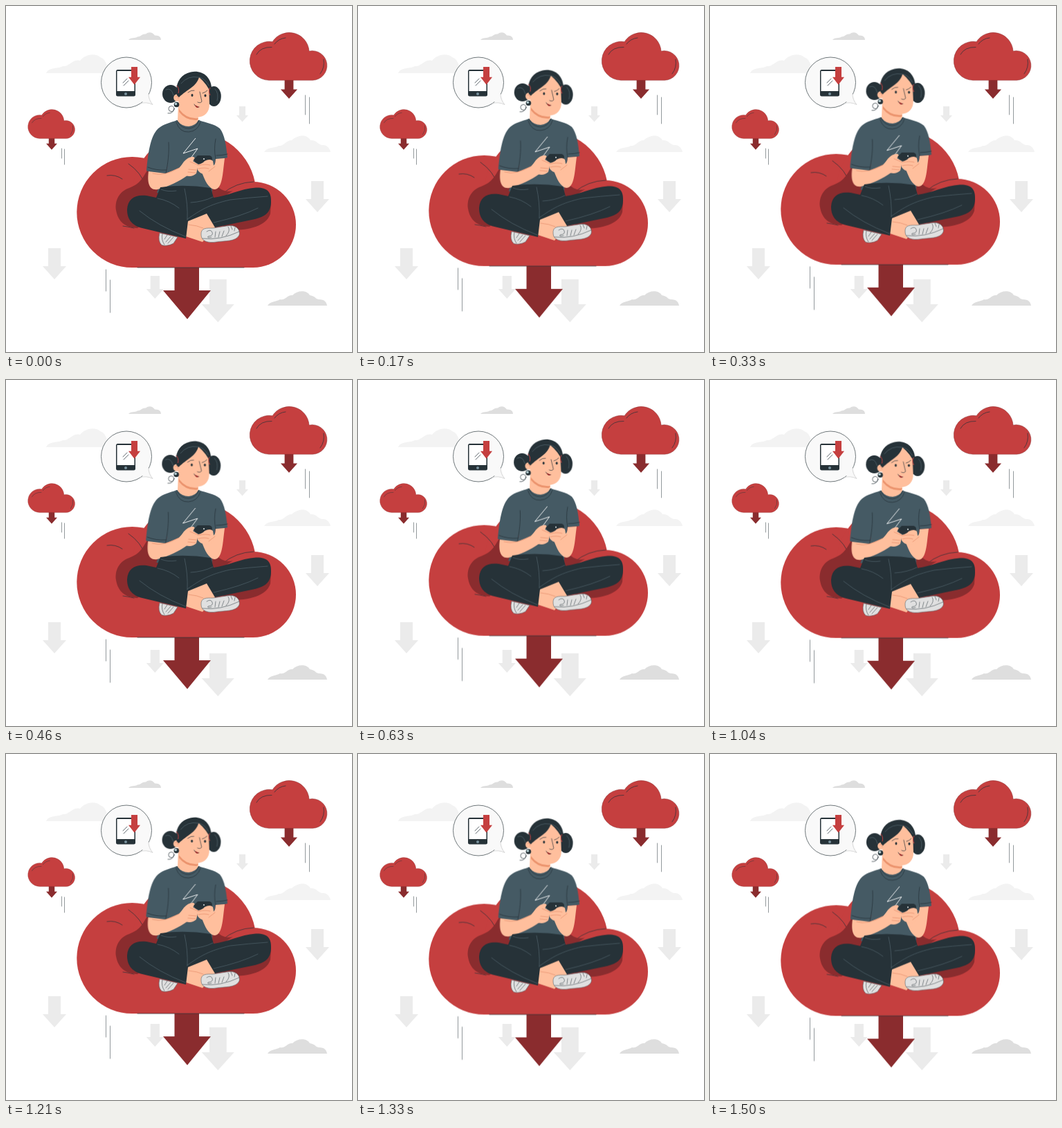
Write an HTML page without scripts that moves like this. It is 500x500 px and loops after 1540 ms.

```html
<!DOCTYPE html>
<html lang="en">
<head>
<meta charset="utf-8">
<title>Cloud download</title>
<style>
html, body { margin: 0; width: 100%; height: 100%; overflow: hidden; background: #fff; }
svg { display: block; width: 100vw; height: 100vh; }
.red { fill: #c53f3f; }
.wine { fill: #8a2c2e; }
.pale { fill: #ebebeb; }
.mist { fill: #f3f3f3; }
.grey { fill: #dedede; }
.ink { fill: #263238; }
.shirt { fill: #455a64; }
.skin { fill: #ffbf9d; }
.line { fill: none; stroke: #263238; stroke-width: .7; stroke-linecap: round; stroke-linejoin: round; }
.thin { stroke-width: .5; }
.rim { stroke: #8a2c2e; stroke-width: .5; }
.seam { fill: none; stroke: #52656e; stroke-width: .7; stroke-linecap: round; }
.blush { fill: none; stroke: #e58e6c; stroke-width: .7; stroke-linecap: round; }
.float, .nod, .breathe { animation: 1540ms linear infinite; }
.float { animation-name: float; }
.nod { animation-name: nod; transform-origin: 268px 165px; }
.breathe { animation-name: breathe; transform-origin: 310px 240px; }
@keyframes float {
  0% { transform: translateY(0); }
  11% { transform: translateY(-2.2px); }
  30% { transform: translateY(-6px); }
  41% { transform: translateY(-8.4px); }
  48% { transform: translateY(-9.2px); }
  57% { transform: translateY(-7.6px); }
  78.6% { transform: translateY(-2.9px); }
  97.4% { transform: translateY(.4px); }
  100% { transform: translateY(0); }
}
@keyframes nod {
  0%, 100% { transform: none; }
  48% { transform: translateY(-.5px) rotate(-1.5deg); }
}
@keyframes breathe {
  0%, 100% { transform: none; }
  48% { transform: scaleX(1.012); }
}
</style>
</head>
<body>
<svg viewBox="0 0 500 500">
  <defs>
    <path id="arrow" d="M-9 0H9V26H17L0 45L-17 26H-9Z"/>
    <g id="puff">
      <path class="rim" d="M380 107.300A28 28 0 1 1 385 51.700A28.800 28.800 0 0 1 438 65.200A21.300 21.300 0 1 1 443 107.300Z"/>
      <path class="line" d="M362 70Q368 59 384 59.500M388 55Q394 47 404 46M459 77Q461 89 454 98"/>
    </g>
  </defs>

  <!-- sky -->
  <path class="grey" d="M177 49C180 45 187 47 190 44.500C196 44 196 40 202 40.500C207 36 213 39 215 42.500C221 42 224 45 224 49Z"/>
  <path class="mist" d="M58 97C62 88 75 91 82 87C92 88 96 76 107 79C115 69 130 68 136 74C147 78 143 88 155 97Z"/>
  <path class="mist" d="M373 211C378 203 388 206 394 202C402 203 404 194 413 194C421 187 434 184 440 194C449 193 450 200 457 201C464 200 468 206 469 211Z"/>
  <path class="grey" d="M378 433C382 426 390 428 396 424C404 426 406 417 414 418C421 411 434 410 439 418C449 420 446 423 452 424C461 424 463 428 464 433Z"/>
  <g class="pale">
    <use href="#arrow" transform="translate(341.500 145) scale(.5)"/>
    <use href="#arrow" transform="translate(450 253)"/>
    <use href="#arrow" transform="translate(70 350)"/>
    <use href="#arrow" transform="translate(215.300 390) scale(.735)"/>
    <use href="#arrow" transform="translate(306.300 395) scale(1.380)"/>
  </g>
  <g class="wine">
    <use href="#arrow" transform="translate(409 102) scale(.71)"/>
    <use href="#arrow" transform="translate(66 186.500) scale(.47)"/>
  </g>
  <use href="#puff" class="red"/>
  <use href="#puff" class="red" transform="translate(-182.500 126.200) scale(.608)"/>
  <path class="line thin" d="M432.500 129V157M438.500 132V170M80.500 206V220M84.500 207V229"/>

  <!-- speech bubble -->
  <circle cx="174" cy="110.500" r="36.500" fill="#f9f9f9" stroke="#4b5559" stroke-width=".8"/>
  <path d="M192 137L212 142.500L205 125Z" fill="#f9f9f9"/>
  <path d="M193 141Q203 138 212 142.500Q206 136 206 127" fill="none" stroke="#c9c9c9" stroke-width=".7"/>
  <rect class="ink" x="159" y="92" width="28" height="38.600" rx="2.500"/>
  <path d="M160.500 94H185.500V123H160.500Z" fill="#fff"/>
  <circle cx="173" cy="127" r="2" fill="#78909c"/>
  <path class="line" d="M169 111L175 105M170 115L177 108"/>
  <use href="#arrow" class="red" transform="translate(185.500 88) scale(.5 .57)"/>

  <g class="float">
    <!-- seat -->
    <path class="line thin" d="M144.500 381V412M150.500 396V443"/>
    <path class="wine" d="M243.500 370H279V411H296L262 452.500L227 411H243.500Z"/>
    <g class="red">
      <circle cx="182.300" cy="298" r="80"/>
      <circle cx="272" cy="272" r="89.500"/>
      <circle cx="357" cy="316" r="62"/>
      <path d="M182 290H357V378H182Z"/>
    </g>
    <path class="line" d="M190 378H344M146 245Q158 243 168 250M177 228Q196 241 202 261M313 271Q332 255 358 254M169 318Q177 319 185 321"/>
    <path class="wine" d="M206 234C198 248 194 257 178 263C163 268 157 282 159 295C162 312 172 320 190 321L230 290V234Z"/>
    <path class="wine" d="M298 246C301 260 313 271 328 267L300 285L285 262ZM325 324C360 324 378 314 382 300L383 285L300 310Z"/>

    <!-- torso -->
    <g class="breathe">
      <path class="shirt" d="M247 165C237 169 228 170 220 177C208 188 205 216 203 238Q216 243 231 242L234 230C232 244 222 254 218 270H298C298 252 302 235 303 221Q313 221 320 219C318 200 316 186 309 177C301 170 289 169 279 165Z"/>
      <path class="line" d="M231 242C234 228 236 211 235 197M246 168Q251 183 264 182Q277 181 281 168M247 166Q253 177 264 177Q275 176 279 165M303 221Q300 207 303 192M205 233Q217 238 232 237M218 263Q222 252 228 246M304 216Q312 216 320 214"/>
      <path d="M274 191L256 213L277 206L264 224" fill="none" stroke="#fff" stroke-width=".9"/>
      <path class="skin" d="M206 239C204 254 206 267 219 265C235 261 251 253 262 245L273 233L263 221L250 234L231 242Z"/>
      <path class="blush" d="M212 242Q228 247 250 234"/>
    </g>

    <!-- legs -->
    <path class="skin" d="M261 306L290 296L303 319L284 341L260 333Z"/>
    <path class="ink" d="M223 262Q258 257 296 263L300 277C319 275 339 264 361 262.500C377 262 384 268 383 284C382 302 371 306 350 310L302 320L290 300L263 311L260 336L197 321C181 317 175 307 175 294C176 278 187 272 203 274L217 277Z"/>
    <path class="seam" d="M258 264Q263 286 262 309M262 308C281 295 293 287 324 280Q350 277 378 275M193 296Q220 318 259 333M224 265Q233 269 246 267M267 284Q285 283 299 276M300 313Q340 304 364 292M219 278Q236 281 250 292"/>
    <path class="blush" d="M264 316Q276 317 285 321"/>

    <!-- shoes -->
    <g fill="#e0e0e0" stroke="#59666b" stroke-width=".6" stroke-linejoin="round">
      <path d="M222 328L248 334L242 343Q233 348 225 345.500Q219 340 222 328Z"/>
      <path d="M282 331C281 320 290 321 299 321L318 318C332 315 339 323 337 331C332 341 316 339 304 341C293 343 282 340 282 331Z"/>
    </g>
    <path class="line thin" d="M226 329Q224 338 229 345M229 337L233 331M231 341L238 333M234 343L242 334M284 336Q310 339 337 326M290 326Q296 322 298 327T292 333Q290 336 297 334M302 334L303 326M307 334L309 326M312 333L315 325M318 332Q325 325 321 319M325 318L327 323M331 320L330 325"/>

    <!-- hands and phone -->
    <path class="skin" d="M303 221C303 230 300 232 293 233L283 240C287 252 293 264 301 265C313 265 313 242 316 220Z"/>
    <path class="skin" d="M250 235L257 225Q264 217 271 218Q275 220 270 224L278 229L275 242Q268 248 260 245Z"/>
    <path class="ink" d="M277 216H294Q298 217 298 221L296 229H280L274 226L271 222Z"/>
    <circle cx="286" cy="221" r="1.100" fill="#d9e0e3"/>
    <path class="skin" d="M278 229Q285 227 287 224Q295 220 299 224L301 236Q296 245 286 243Q280 242 277 237Q276 232 278 229Z"/>
    <path class="blush" d="M266 225Q273 228 278 230M264 236L275 237M263 240L274 241M279 230Q289 228 295 230M278 235Q287 233 293 235M293 239L302 232"/>

    <!-- head -->
    <path class="skin" d="M249 140L248 166Q254 174 264 174Q274 173 278 165L277 150Z"/>
    <g class="nod">
      <ellipse class="ink" cx="238" cy="127" rx="12" ry="13"/>
      <ellipse class="ink" cx="300.500" cy="130.500" rx="10.300" ry="14.500"/>
      <path d="M250 149Q261 164 278 162L276 165Q260 166 250 153Z" fill="#eb936d"/>
      <path class="skin" d="M251 113L249 143C253 156 264 161 276 161C288 160 294 153 294 142L293 108L275 100Z"/>
      <circle class="skin" cx="247.500" cy="132.500" r="5.300"/>
      <path class="ink" d="M247 129C244 113 251 99 267 95.500C284 92 300 103 297 128Q291 113 279 103C275 117 262 120 250 132Z"/>
      <path class="seam" d="M253 112Q263 100 278 103M279 103Q288 105 293 115M231 121Q239 117 242 129M302 120Q308 126 305 137"/>
      <path d="M246.500 115Q251 119 249 126M295 118Q292 122 295 129" fill="none" stroke="#c53f3f" stroke-width="1"/>
      <ellipse class="ink" cx="269" cy="129" rx="1.500" ry="2"/>
      <ellipse class="ink" cx="288" cy="129.500" rx="1.500" ry="2"/>
      <path class="line" d="M263 125Q268 121 272 122M284 126Q288 125 291 122M280 124L283 138Q281 141 277 139M272 142Q274 147 279 146"/>
      <path d="M273 143Q275 149 279 146Z" fill="#9c302f"/>
      <path class="blush" d="M245 131Q249 129 249 134"/>
      <circle class="ink" cx="246.500" cy="142.500" r="3.800"/>
      <circle cx="245.500" cy="141.500" r="1.800" fill="#b9d3d8"/>
      <circle class="line" cx="239" cy="148.500" r="4"/>
      <path class="line" d="M234 155Q241 156 243 149"/>
    </g>
  </g>
</svg>
</body>
</html>
```
